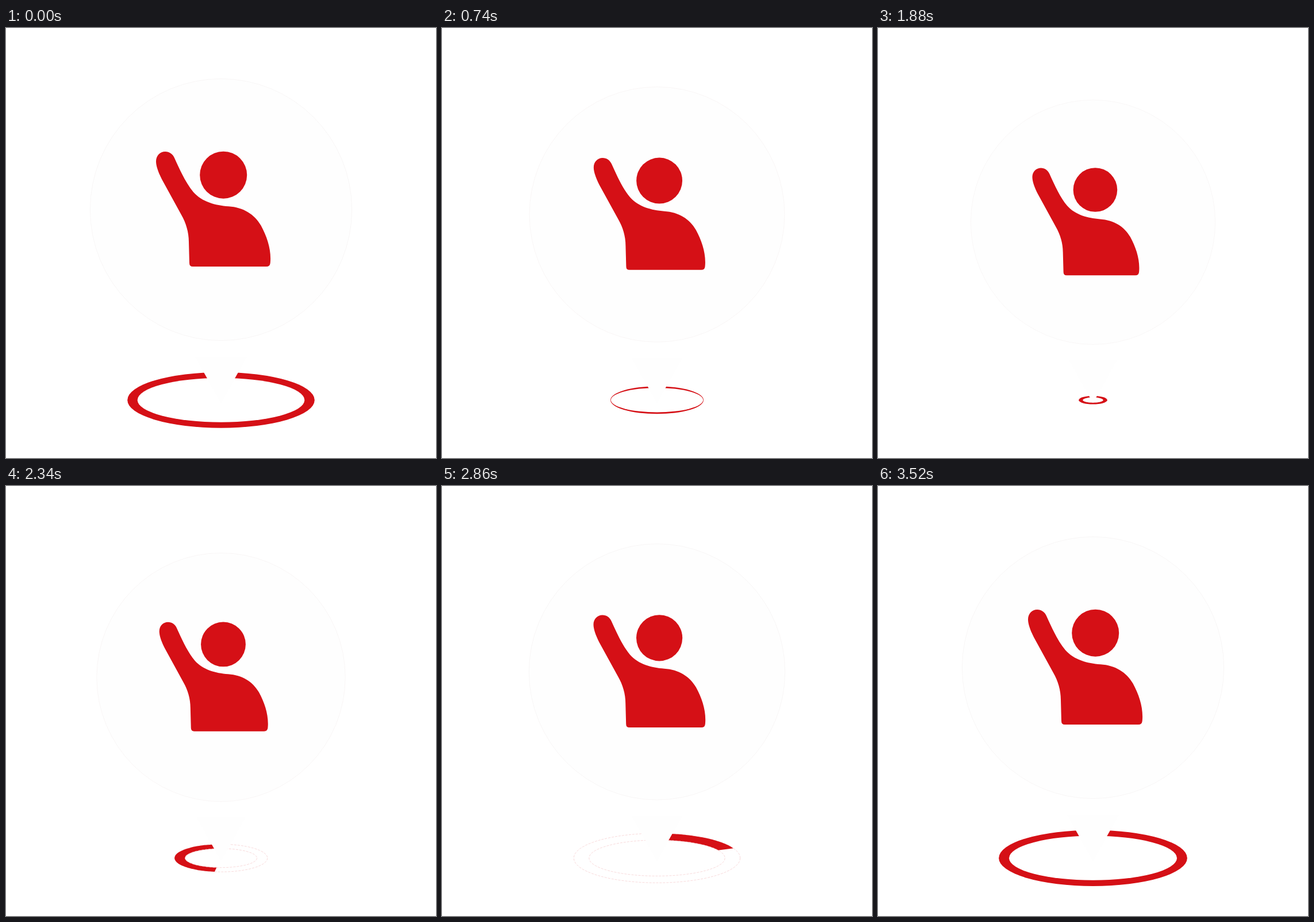
These frames come from a looping animation (748x748 px, 3.54 s). An HTML page:

```html
<!DOCTYPE html>
<html lang="en">
<head>
<meta charset="utf-8">
<title>Raised hand pin</title>
<style>
  html, body { margin: 0; width: 100%; height: 100%; overflow: hidden; background: #fff; }
  svg { display: block; width: 100vw; height: 100vh; }
</style>
</head>
<body>
<svg viewBox="0 0 748 748">
  <g transform="translate(374 647.2)">
    <ellipse id="rim" fill="none" stroke="#f5c9cb" stroke-width=".7" stroke-dasharray="4 2"/>
    <path id="sweep" fill="#d51016"/>
    <ellipse id="hole" fill="#fff" stroke="#f5c9cb" stroke-width=".7" stroke-dasharray="4 2"/>
  </g>
  <g id="pin">
    <path d="M329 572H419L374 652.6Z" fill="#fefefe"/>
    <circle cx="374" cy="316" r="227.7" fill="#fefefe" stroke="#f4f0f0" stroke-width=".6"/>
    <g fill="#d51016">
      <circle cx="378.2" cy="255.7" r="41"/>
      <path d="M261 232C261 222 268 215 277 215C284 215 290 219 293 226C303 248 313 270 326 285.5C341 302.500 364 308.500 387 310.300C413 312 432 324 443.500 343.500C454 363 461 384 460 405L459.700 409Q459 415 453 415H325Q319 415 319 409L318 372C318 355 313 339 305 325L271 263C266 253 261 241 261 232Z"/>
    </g>
  </g>
</svg>
<script>
const LOOP = 3540, STEP = 20;
const OUTER_RATIO = 0.2975, INNER_RATIO = 0.2645;
const WIPE_START = 1988, WIPE_TURN = 2672, WIPE_END = 3356;

const [rim, sweep, hole, pin] = ['rim', 'sweep', 'hole', 'pin'].map(id => document.getElementById(id));

// Eased 0 to 1 between two times
function ramp(t, from, to) {
  const x = Math.min(1, Math.max(0, (t - from) / (to - from)));
  return x * x * (3 - 2 * x);
}

function setEllipse(el, r, ratio) {
  el.setAttribute('rx', r);
  el.setAttribute('ry', r * ratio);
}

// Elliptical wedge; from and to are turns clockwise from the top
function wedge(r, from, to) {
  const ry = r * OUTER_RATIO, span = to - from;
  if (r < 0.1 || span < 0.001) return '';
  const arc = `A${r} ${ry} 0 `;
  if (span > 0.999) return `M0 ${-ry}${arc}1 1 0 ${ry}${arc}1 1 0 ${-ry}Z`;
  const point = turn => {
    const a = turn * 2 * Math.PI;
    return `${r * Math.sin(a)} ${-ry * Math.cos(a)}`;
  };
  return `M0 0L${point(from)}${arc}${span > 0.5 ? 1 : 0} 1 ${point(to)}Z`;
}

function draw(t) {
  const half = LOOP / 2;
  const s = 1 - ramp(half - Math.abs(t - half), 0, half) / 15;
  pin.setAttribute('transform', `translate(374 647) scale(${s}) translate(-374 -647)`);

  // The ring grows late in the loop and shrinks on into the next one
  const u = t < 1400 ? t + LOOP : t;
  const outer = 169 * (ramp(u, 1425, 3310) - ramp(u, 3327, 5180));
  const inner = 148 * (ramp(u, 1455, 3430) - ramp(u, 3390, 5275));
  setEllipse(rim, outer, OUTER_RATIO);
  setEllipse(hole, Math.max(0, inner), INNER_RATIO);

  const wiping = t > WIPE_START && t < WIPE_END;
  rim.setAttribute('visibility', wiping ? 'visible' : 'hidden');
  hole.setAttribute('stroke-opacity', wiping ? 1 : 0);
  const path = t < WIPE_TURN
    ? wedge(outer, ramp(t, WIPE_START, WIPE_TURN), 1)
    : wedge(outer, 0, ramp(t, WIPE_TURN, WIPE_END));
  sweep.setAttribute('d', path);
}

const start = performance.now();
function tick() {
  const t = (performance.now() - start) % LOOP;
  draw(Math.floor(t / STEP) * STEP);
  requestAnimationFrame(tick);
}
draw(0);
requestAnimationFrame(tick);
</script>
</body>
</html>
```
